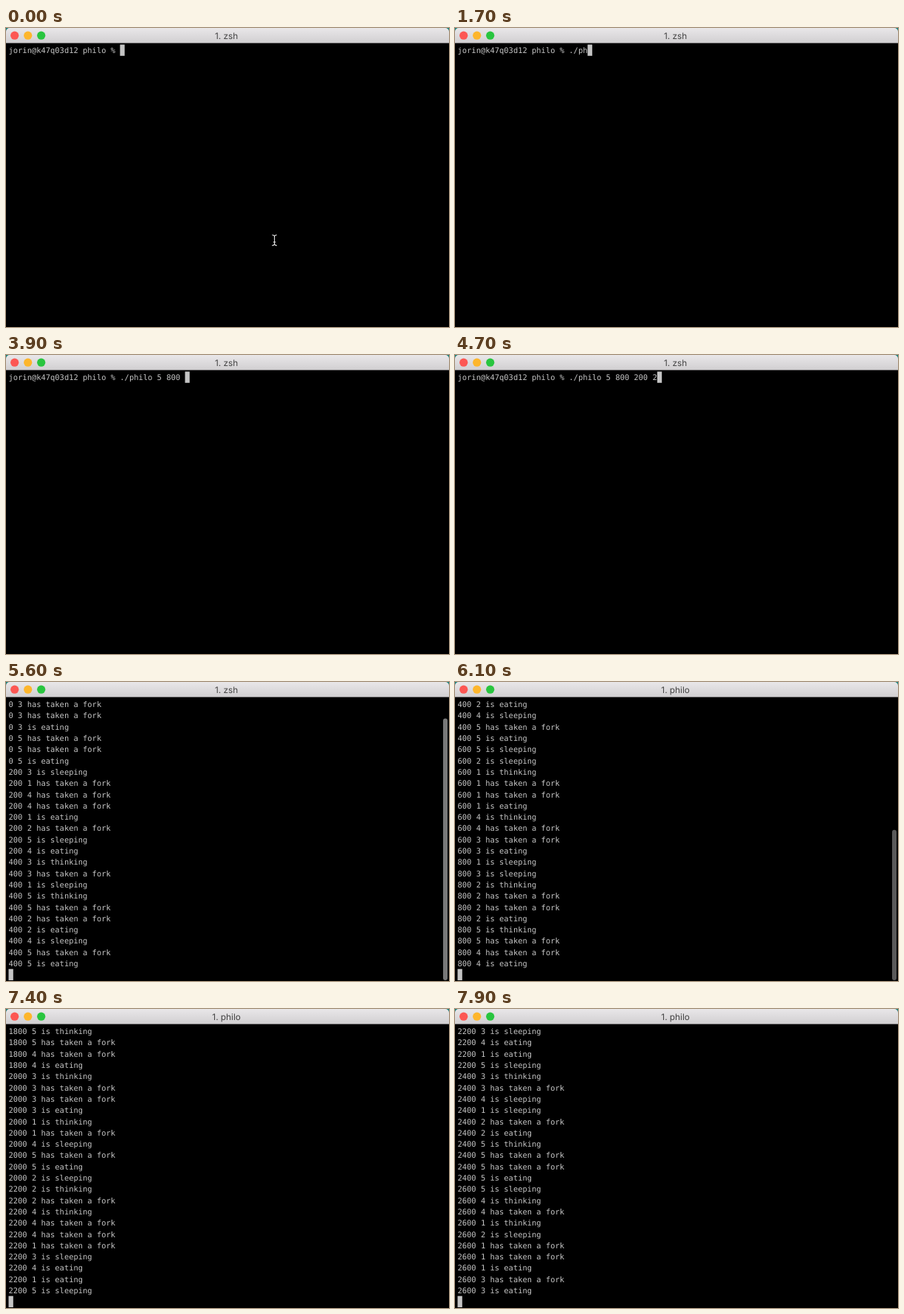
An HTML page with a canvas that plays this animation: 600x406 px, repeating every 8000 ms.

```html
<!DOCTYPE html>
<html lang="en">
<head>
<meta charset="utf-8">
<title>Terminal</title>
<style>
  html, body { margin: 0; width: 100%; height: 100%; overflow: hidden; background: #000; }
  canvas { display: block; width: 600px; height: 406px; }
</style>
</head>
<body>
<canvas id="stage" width="600" height="406"></canvas>
<script>
const ctx = document.getElementById('stage').getContext('2d');

const LOOP = 8000, STEP = 100;
const W = 600, H = 406, BAR = 21;
const LEFT = 3.5, TOP = 22.5, CHAR = 6.288, ROW = 15.3, ROWS = 25;
const MONO = '10.445px "DejaVu Sans Mono", monospace';
const SANS = '11.8px Inter, Roboto, sans-serif';
const TEXT = '#c5c5c5', CURSOR = '#c4c4c4';

const PROMPT = 'jorin@k47q03d12 philo % ';
// One character per step, "_" is a pause
const TYPING = '._/__p___hi_l_o_ _____5 __80_0_ _200_ _200';
const TYPE_START = 800;

const RUN = 5200, TICK = 200;
const ACTIONS = { f: 'has taken a fork', e: 'is eating', s: 'is sleeping', t: 'is thinking' };
// Order in which the philosophers get their turn in each round
const TURNS = `CAAABBB SBAABCRA CCRAABBSAA SRAAAACCBB SRAAAACCBB RSAAABCCAB CCSRBBAAAA
  AAAABBSRCC SRAAAACCBB SRAAAACCBB AAAACCRBBS CCAAABSABR CCSRBBAAAA SCCARAAABB`.split(/\s+/);

// A and B eat, C waits with one fork, S and R go to sleep; all move one seat per round.
function roundLines(turns, round) {
  const seat = offset => (round + offset) % 5 + 1;
  const seats = { A: seat(2), B: seat(4), C: seat(0), S: seat(1), R: seat(3) };
  const think = round > 1 ? 't' : '';
  const plans = { A: think + 'ffe', B: round ? 'fe' : 'ffe', C: think + 'f', S: 's', R: 's' };
  const done = { A: 0, B: 0, C: 0, S: 0, R: 0 };
  return [...turns].map(who => `${round * TICK} ${seats[who]} ${ACTIONS[plans[who][done[who]++]]}`);
}

const ROUNDS = TURNS.map(roundLines);

function linesAt(t) {
  const steps = Math.max(0, (t - TYPE_START) / STEP + 1);
  const lines = [PROMPT + TYPING.slice(0, steps).replaceAll('_', '')];
  if (t < RUN) return lines;
  const count = Math.floor((t - RUN) / TICK) + 1;
  return lines.concat(...ROUNDS.slice(0, count), '');
}

function roundRect(x, y, w, h, r, fill) {
  ctx.beginPath();
  ctx.roundRect(x, y, w, h, r);
  ctx.fillStyle = fill;
  ctx.fill();
}

function drawTitleBar(title) {
  ctx.fillStyle = '#1a7f78';
  ctx.fillRect(0, 0, W, 6);
  const shade = ctx.createLinearGradient(0, 0, 0, BAR);
  shade.addColorStop(0, '#e9e7e9');
  shade.addColorStop(1, '#d0ced0');
  roundRect(0, 0, W, BAR - 1, [5, 5, 0, 0], shade);
  ctx.fillStyle = '#aaa8aa';
  ctx.fillRect(0, BAR - 1, W, 0.6);

  ['#fc5753', '#fdb62c', '#29c53f'].forEach((fill, i) => {
    ctx.beginPath();
    ctx.arc(11.7 + i * 18, 10.2, 5.6, 0, Math.PI * 2);
    ctx.fillStyle = fill;
    ctx.fill();
  });

  ctx.font = SANS;
  ctx.textAlign = 'center';
  ctx.fillStyle = '#444';
  ctx.fillText(title, 298.6, 14.6);
}

function drawText(lines) {
  ctx.font = MONO;
  ctx.textAlign = 'left';
  ctx.fillStyle = TEXT;
  lines.forEach((line, i) => ctx.fillText(line, LEFT, TOP + i * ROW + 11.6));
  const last = lines.length - 1;
  ctx.fillStyle = CURSOR;
  ctx.fillRect(LEFT + lines[last].length * CHAR, TOP + last * ROW, CHAR, ROW);
}

function drawScrollbar(total, alpha) {
  const track = H - BAR - 1;
  const size = track * ROWS / total;
  ctx.globalAlpha = alpha;
  roundRect(592, H - 1 - size, 6, size, 3, '#787878');
  ctx.globalAlpha = 1;
}

function drawPointer(x, y) {
  ctx.beginPath();
  for (const s of [-1, 1]) {
    ctx.moveTo(x - 3.2, y + s * 7.2);
    ctx.quadraticCurveTo(x, y + s * 7.2, x, y + s * 4.4);
    ctx.quadraticCurveTo(x, y + s * 7.2, x + 3.2, y + s * 7.2);
  }
  ctx.moveTo(x, y - 5);
  ctx.lineTo(x, y + 5);
  ctx.moveTo(x - 1.8, y + 2.6);
  ctx.lineTo(x + 1.8, y + 2.6);
  ctx.strokeStyle = '#e6e6e6';
  ctx.lineWidth = 1.1;
  ctx.stroke();
}

function draw(now) {
  const t = Math.floor((now % LOOP) / STEP) * STEP;
  const lines = linesAt(t);

  ctx.textRendering = 'geometricPrecision';
  ctx.fillStyle = '#000';
  ctx.fillRect(0, 0, W, H);
  drawTitleBar(t < 5800 ? '1. zsh' : '1. philo');
  drawText(lines.slice(-ROWS));

  const fade = Math.min(1, (6400 - t) / 400);
  if (lines.length > ROWS && fade > 0) drawScrollbar(lines.length, fade);
  if (t < TYPE_START) drawPointer(363.6, 288.2);
}

const start = performance.now();
function tick() {
  draw(performance.now() - start);
  requestAnimationFrame(tick);
}
tick();
</script>
</body>
</html>
```
